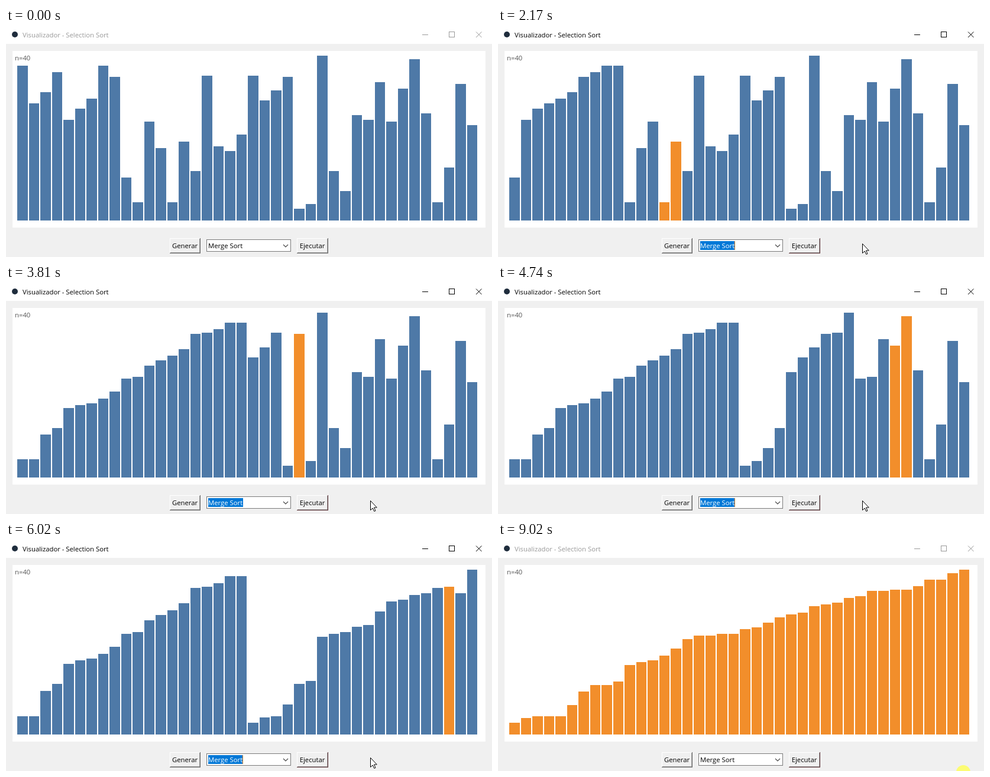
Animation of 822x389 px, one loop 9.07 s. Source, as an HTML page:

```html
<!DOCTYPE html>
<html lang="es">
<head>
<meta charset="utf-8">
<title>Visualizador</title>
<style>
  html, body { margin: 0; width: 100%; height: 100%; overflow: hidden; background: #f0f0f0; }
  svg { display: block; width: 822px; height: 389px; }
  text { font: 11.3px "Open Sans", "Noto Sans", sans-serif; white-space: pre; }
  .crisp { shape-rendering: crispEdges; }
</style>
</head>
<body>
<svg id="stage" viewBox="0 0 822 389" xmlns="http://www.w3.org/2000/svg"></svg>
<script>
const LOOP = 9070;
const BLUE = '#4e79a7', ORANGE = '#f28e2b';
const PRESS = 760, RELEASE = 930, SORTED = 7073, LEAVE = 8270, BLUR = 9020;

const numbers = [
  94, 71, 78, 90, 61, 68, 74, 94, 87, 26, 11, 60, 44, 11, 48, 30, 88, 45, 42, 52,
  88, 73, 79, 87, 7, 10, 100, 30, 18, 64, 61, 84, 60, 80, 98, 65, 11, 32, 83, 58
];

// Progress of the sort: [time, step]
const pace = [[930, 0], [2170, 51.5], [3140, 89.5], [3810, 117.5], [4090, 130.5],
  [4740, 158.5], [6020, 212.5], [6085, 215.5], [6820, 244.5], [7085, 256]];
const pointerX = [[330, 640], [620, 525], [1270, 525], [1500, 565], [1800, 617]];
const pointerY = [[330, 386], [620, 369], [1270, 369], [1500, 375], [1800, 366]];

// The screen refreshes 14 times in each of these spans
const spans = [320, 1280, 2240, 3200, 4150, 5080, 6020, 6950, 7880];

function sortSteps(source) {
  const a = source.slice();
  const steps = [{ values: source, lit: [] }];
  const record = (...lit) => steps.push({ values: a.slice(), lit });
  function sort(lo, hi) {
    if (lo >= hi) return;
    const mid = (lo + hi) >> 1;
    sort(lo, mid);
    sort(mid + 1, hi);
    record(lo, mid + 1);
    const left = a.slice(lo, mid + 1), right = a.slice(mid + 1, hi + 1);
    for (let k = lo; k <= hi; k++) {
      const takeLeft = !right.length || (left.length && left[0] <= right[0]);
      a[k] = (takeLeft ? left : right).shift();
      record(k);
    }
  }
  sort(0, a.length - 1);
  steps.push({ values: a, lit: a.map((_, i) => i) });
  return steps;
}

const steps = sortSteps(numbers);
const stage = document.getElementById('stage');

function add(tag, attrs, content) {
  const node = document.createElementNS('http://www.w3.org/2000/svg', tag);
  set(node, attrs);
  if (content) node.textContent = content;
  return stage.appendChild(node);
}
function set(node, attrs) {
  for (const key in attrs) node.setAttribute(key, attrs[key]);
}
function box(x, y, width, height, fill) {
  return add('rect', { x, y, width, height, fill, class: 'crisp' });
}
function label(x, y, content, fill = '#000', anchor = 'start') {
  return add('text', { x, y, fill, 'text-anchor': anchor }, content);
}
function show(node, visible) {
  node.setAttribute('visibility', visible ? 'visible' : 'hidden');
}
function along(keys, t) {
  if (t <= keys[0][0]) return keys[0][1];
  for (let i = 1; i < keys.length; i++) {
    const [t0, v0] = keys[i - 1], [t1, v1] = keys[i];
    if (t < t1) return v0 + (v1 - v0) * (t - t0) / (t1 - t0);
  }
  return keys[keys.length - 1][1];
}
function refreshTime(t) {
  for (let i = spans.length - 2; i >= 0; i--) {
    if (t + 10 < spans[i]) continue;
    const gap = (spans[i + 1] - spans[i]) / 14;
    return spans[i] + Math.floor((t + 10 - spans[i]) / gap) * gap;
  }
  return t;
}

function button(x, width, content) {
  box(x, 357, width, 26, '#696969');
  box(x, 357, width - 1, 25, '#fff');
  box(x + 1, 358, width - 2, 24, '#a0a0a0');
  box(x + 1, 358, width - 3, 23, '#f0f0f0');
  label(x + width / 2 - 0.5, 374, content, '#000', 'middle');
}

// Window
box(0, 0, 822, 389, '#f0f0f0');
box(0, 0, 822, 27, '#fff');
add('circle', { cx: 15, cy: 11, r: 5, fill: '#1f2d3d' });
const title = label(28, 16, 'Visualizador - Selection Sort');
const controls = [
  add('path', { d: 'M704 11.5H714M749.5 6.5H758.5V15.5H749.5Z', fill: 'none', class: 'crisp' }),
  add('path', { d: 'M795 6.5L804.5 16M804.5 6.5L795 16', fill: 'none' })
];

// Chart
box(11, 39, 800, 300, '#fff');
const bars = numbers.map((_, i) => {
  const left = 19 + i * 19.5;
  const x = Math.round(left);
  return box(x, 0, Math.round(left + 17.5) - x, 0, BLUE);
});
label(15, 55, 'n=40', '#555');

// Controls
button(277, 52, 'Generar');
button(492, 53, 'Ejecutar');
const pressedEdge = add('path', { d: 'M492 382.5H544.5V357', fill: 'none', stroke: '#5a3034', class: 'crisp' });
box(339, 359, 143, 21, '#7a7a7a');
box(340, 360, 141, 19, '#fff');
const selection = box(342, 362, 59, 15, '#0078d7');
const choice = label(342, 374, 'Merge Sort');
const caret = box(400, 362, 1, 15, '#ff8728');
add('path', { d: 'M469 368L473 372L477 368', fill: 'none', stroke: '#444', 'stroke-width': 1.1 });

// Pointer
const halo = add('circle', { r: 12, fill: '#ffff55', opacity: 0.8 });
const pointer = add('path', {
  d: 'M0.5 0.5V16.5L4.2 13L6.8 18.5L9 17.5L6.5 12H11.3Z',
  fill: '#fff', stroke: '#000', 'stroke-linejoin': 'round'
});

function drawBars(t) {
  const index = t >= SORTED ? steps.length - 1 : Math.min(Math.floor(along(pace, refreshTime(t))), steps.length - 2);
  const { values, lit } = steps[index];
  const scale = 280 / Math.max(...values);
  bars.forEach((bar, i) => {
    const y = Math.round(327 - values[i] * scale);
    set(bar, { y, height: 327 - y, fill: lit.includes(i) ? ORANGE : BLUE });
  });
}

function drawWindow(t) {
  const active = t >= PRESS && t < BLUR;
  set(title, { fill: active ? '#000' : '#999' });
  controls.forEach(node => set(node, { stroke: active ? '#000' : '#999' }));
  set(choice, { fill: active ? '#fff' : '#000' });
  show(selection, active);
  show(pressedEdge, t >= PRESS);
  // The caret is on for 600 of every 900 ms
  show(caret, active && (t + 680) % 900 < 594);
}

function drawPointer(t) {
  const now = refreshTime(t);
  const x = along(pointerX, now), y = along(pointerY, now);
  const leaving = t >= BLUR;
  set(pointer, { transform: `translate(${Math.round(x) - 1} ${Math.round(y)})` });
  set(halo, { cx: leaving ? 787 : x, cy: leaving ? 391 : y });
  show(pointer, t >= 330 && t < LEAVE);
  show(halo, leaving || (t >= PRESS && t < RELEASE));
}

function render(t) {
  drawBars(t);
  drawWindow(t);
  drawPointer(t);
}

const begin = performance.now();
function tick() {
  render((performance.now() - begin) % LOOP);
  requestAnimationFrame(tick);
}
render(0);
requestAnimationFrame(tick);
</script>
</body>
</html>
```
